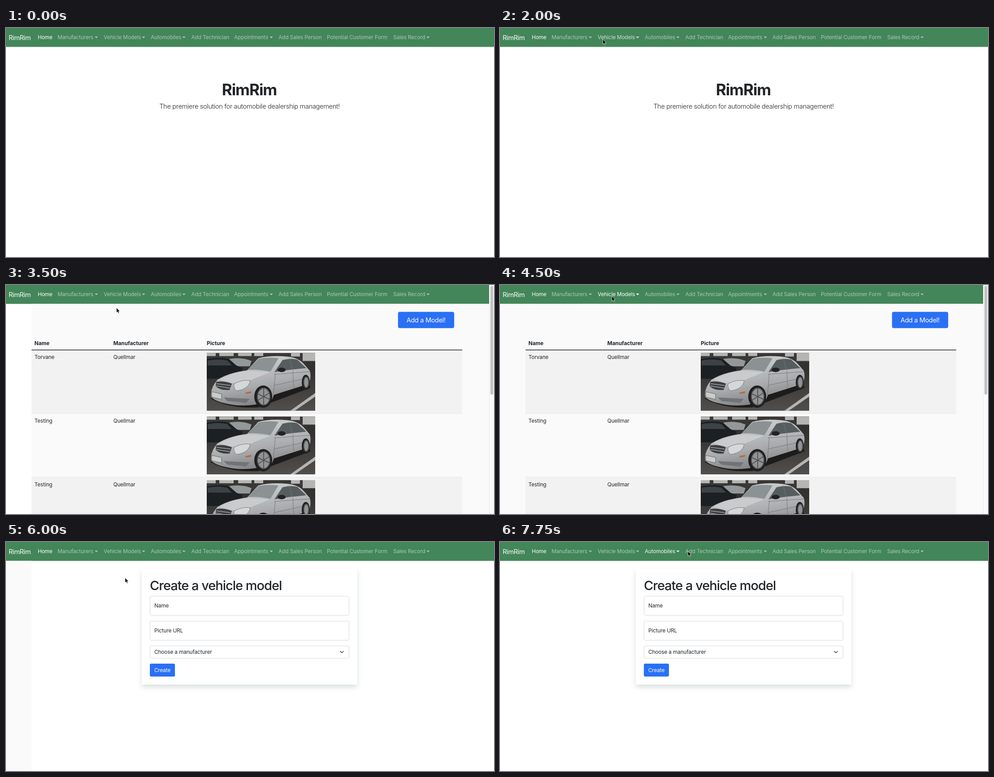
An HTML page that plays this animation: 1089x514 px, repeating every 8 s.

```html
<!DOCTYPE html>
<html lang="en">
<head>
<meta charset="utf-8">
<title>Dealership walkthrough</title>
<style>
  html, body { margin: 0; width: 100%; height: 100%; overflow: hidden; background: #fff; }
  svg { display: block; width: 1089px; height: 514px; }
  text { font: 11.8px Inter, "Liberation Sans", sans-serif; font-optical-sizing: none; letter-spacing: -.01em; fill: #212529; }
  .large { font-size: 14.6px; letter-spacing: -.026em; }
  .lead { font-weight: 300; letter-spacing: -.022em; }
  .bold { font-weight: 700; letter-spacing: 0; }
  .hero { font-size: 35px; font-weight: 700; letter-spacing: -.03em; }
  .title { font-size: 29px; font-weight: 500; letter-spacing: -.035em; }
  .center { text-anchor: middle; }
  .white, #nav text { fill: #fff; }
  .button { fill: #2a70f5; }
  .field { fill: #fff; stroke: #d5d9de; }
  .card { fill: #fff; filter: drop-shadow(0 6px 6px rgba(30, 60, 50, .16)); }
</style>
</head>
<body>
<svg viewBox="0 0 1089 514">
  <defs>
    <clipPath id="frame"><rect width="242" height="130"/></clipPath>
    <linearGradient id="paint" x1=".2" y1="0" x2=".55" y2="1">
      <stop offset=".2" stop-color="#c6c8ca"/>
      <stop offset=".6" stop-color="#aaacae"/>
      <stop offset="1" stop-color="#7d7f82"/>
    </linearGradient>
    <linearGradient id="ground" x2="0" y2="1">
      <stop offset=".3" stop-color="#343230"/>
      <stop offset="1" stop-color="#514f4d"/>
    </linearGradient>
    <g id="car" clip-path="url(#frame)">
      <rect width="242" height="130" fill="url(#ground)"/>
      <rect width="242" height="20" fill="#393836"/>
      <path d="M0 0h20v7H0zM28 0h32v7H28zM70 0h30v7H70zM106 0h20v7h-20zM188 0h20v8h-20zM214 0h28v18h-28z" fill="#b5b6b3"/>
      <path d="M48 14Q76 8 100 18L96 30H62z" fill="#94989a"/>
      <path d="M0 14Q30 8 50 14L66 28 80 34 76 50 30 58 0 58z" fill="#1d2023"/>
      <path d="M2 17Q26 12 46 17L56 28H2z" fill="#3d4246"/>
      <path d="M242 90L186 130H196L242 98z" fill="#b5b4af"/>
      <path d="M8 102Q50 126 116 122L232 78 225 66z" fill="#1d1c1b"/>
      <path d="M24 60Q50 44 90 39L115 12Q140 5 178 8 204 10 217 25L230 40Q234 55 228 67L213 74 150 94 146 104 108 116Q74 121 45 114 16 108 10 98 7 80 24 60z" fill="url(#paint)"/>
      <path d="M28 60Q55 45 90 40L142 43Q118 52 98 61L58 68z" fill="#c9cbcc"/>
      <path d="M91 38L116 13Q138 9 160 12L142 42Q116 36 91 38z" fill="#8a9293"/>
      <path d="M151 43L169 16Q188 11 202 15L222 34 184 38z" fill="#565d5f"/>
      <path d="M184 12L191 38M150 48L230 42M150 73L222 57M153 46L149 94M192 39L194 78" fill="none" stroke="#74787b"/>
      <ellipse cx="167" cy="38" rx="9" ry="5" fill="#202325"/>
      <path d="M21 65Q38 62 56 69L51 83Q31 85 20 75z" fill="#3c3f41"/>
      <path d="M22 69L53 73M21 74L52 79" stroke="#a5a7a9" stroke-width="1.5"/>
      <path d="M61 69Q80 59 97 62 94 81 67 85 59 80 61 69z" fill="#d5d8d8" stroke="#74797c"/>
      <path d="M11 87L33 92V104L11 99z" fill="#cbccca" stroke="#666"/>
      <path d="M38 100L96 103 88 112 46 108z" fill="#717476"/>
      <path d="M86 89L99 86V90L87 92z" fill="#bd663d"/>
      <g fill="#1f1f1f">
        <ellipse cx="126" cy="98" rx="20" ry="25"/>
        <ellipse cx="221" cy="66" rx="9" ry="17"/>
      </g>
      <g fill="#919395" stroke="#555" stroke-width="2">
        <ellipse cx="127" cy="98" rx="14" ry="19"/>
        <ellipse cx="222" cy="66" rx="5.5" ry="12"/>
        <path d="M127 80V116M114 92L140 104M115 106L139 90"/>
      </g>
    </g>
  </defs>

  <g id="nav">
    <rect width="1089" height="42.4" fill="#438659"/>
    <text class="large" x="6" y="27">RimRim</text>
  </g>

  <g id="home">
    <text class="hero center" x="543" y="150.5">RimRim</text>
    <text class="large lead center" x="543.5" y="181.3">The premiere solution for automobile dealership management!</text>
  </g>

  <g id="list">
    <rect y="42.4" x="57" width="1032" height="472" fill="#fafafa"/>
    <rect class="button" x="874.8" y="60.3" width="125.3" height="36.5" rx="4"/>
    <text class="large white center" x="937.3" y="84.2">Add a Model!</text>
    <text class="bold" x="63.5" y="134.5">Name</text>
    <text class="bold" x="239.5" y="134.5">Manufacturer</text>
    <text class="bold" x="448" y="134.5">Picture</text>
    <g id="rows"></g>
    <rect x="57" y="145" width="961" height="1.5" fill="#212529"/>
    <path d="M1078 0h11v514h-11z" fill="#fafafa"/>
    <path d="M1078.5 0V514" stroke="#e8e8e8"/>
    <rect x="1081" y="2" width="6.3" height="244" rx="3.1" fill="#c1c1c1"/>
  </g>

  <g id="form">
    <rect class="card" x="303" y="60" width="481" height="260"/>
    <text class="title" x="321" y="107.5">Create a vehicle model</text>
    <rect class="field" x="321.5" y="121.5" width="444" height="43" rx="3"/>
    <rect class="field" x="321.5" y="177.5" width="444" height="43" rx="3"/>
    <rect class="field" x="321.5" y="233" width="444" height="28" rx="3"/>
    <text x="331" y="147.2">Name</text>
    <text x="331" y="203.2">Picture URL</text>
    <text x="331" y="251.2">Choose a manufacturer</text>
    <path d="M745.5 244.8l4 4 4-4" fill="none" stroke="#343a40" stroke-width="1.4"/>
    <rect class="button" x="321" y="273" width="56" height="29" rx="3"/>
    <text class="white center" x="349" y="292">Create</text>
  </g>

  <rect id="margin" y="42.4" width="57" height="472" fill="#fafafa"/>

  <g id="menu">
    <rect x="211.7" y="38.6" width="120" height="60.6" rx="3" fill="#fff" stroke="#000" stroke-opacity=".16"/>
    <rect id="first" x="212" y="44.2" width="119.5" height="24.5"/>
    <rect id="second" x="212" y="68.7" width="119.5" height="24.3" fill="#e9eaec"/>
    <text id="firstLabel" x="224.5" y="61.2">Vehicle Models</text>
    <text x="224.5" y="85.2">Create Model</text>
  </g>

  <path id="cursor" d="M0 0V11L2.5 8.8 4.2 12.8 6 12 4.3 8.2H7.6z" fill="#000" stroke="#fff" stroke-width=".7"/>
</svg>

<script>
const $ = id => document.getElementById(id);
const LOOP = 8000;

// label, x, caret x
const links = [
  ["Home", 71], ["Manufacturers", 115, 198], ["Vehicle Models", 218, 303.5],
  ["Automobiles", 323, 393.5], ["Add Technician", 413.5], ["Appointments", 509, 588.5],
  ["Add Sales Person", 608], ["Potential Customer Form", 716], ["Sales Record", 864, 938.3]
];
$("nav").innerHTML += links.map(([label, x, caret], i) =>
  `<g id="link${i}" fill="#fff" fill-opacity="${i ? .55 : 1}"><text x="${x}" y="25.4">${label}</text>` +
  (caret ? `<path d="M${caret} 19.3h7.2l-3.6 3.6z"/>` : "") + "</g>").join("");

$("rows").innerHTML = ["Torvane", "Testing", "Testing"].map((name, i) => {
  const y = 146 + i * 142.75;
  return `<rect x="57" y="${y}" width="961" height="142.75" fill="${i % 2 ? "#fafafa" : "#f2f2f2"}"/>
    <path d="M57 ${y + 142.5}h961" stroke="#dee2e6"/>
    <text x="63.5" y="${y + 20}">${name}</text><text x="239.5" y="${y + 20}">Quellmar</text>
    <use href="#car" x="448" y="${y + 6.5}"/>`;
}).join("");

// time, x, y
const pointer = [
  [0, -50, -50], [1000, 219, 14], [1250, 229, 25], [1500, 229.5, 25.5], [2750, 237, 33.5],
  [3000, 242, 43], [3250, 246.5, 51], [4000, 249, 29], [4250, 249, 24], [4500, 249.5, 25],
  [5250, 251, 27.5], [5500, 262, 71], [5750, 265.8, 80.2], [7000, 304, 104.5],
  [7250, 301, 84], [7500, 345, 45.5], [7750, 419.3, 20.5]
];
// time, opacity
const modelsGlow = [[0, .55], [2000, .75], [2250, 1], [3500, .55], [4000, .9], [4250, 1], [6000, .55]];
const autosGlow = [[0, .55], [7500, .75], [7750, .95]];

const at = (keys, t) => keys.findLast(key => key[0] <= t);
const show = (id, on) => $(id).style.display = on ? "" : "none";
const within = (t, from, to) => t >= from && t < to;

function draw(t) {
  const onList = within(t, 3500, 6000);
  show("home", t < 3500);
  show("list", onList);
  show("form", t >= 6000);
  show("margin", within(t, 4000, 7500));
  show("menu", within(t, 2500, 3500) || within(t, 5000, 6000));
  show("first", t >= 3250);
  show("second", t >= 5500);
  $("first").setAttribute("fill", onList ? "#2a70f5" : "#e9eaec");
  $("firstLabel").style.fill = onList ? "#fff" : "";
  $("link2").setAttribute("fill-opacity", at(modelsGlow, t)[1]);
  $("link3").setAttribute("fill-opacity", at(autosGlow, t)[1]);
  const [, x, y] = at(pointer, t);
  $("cursor").setAttribute("transform", `translate(${x} ${y})`);
}

const start = performance.now();
(function tick() {
  draw((performance.now() - start) % LOOP);
  requestAnimationFrame(tick);
})();
</script>
</body>
</html>
```
